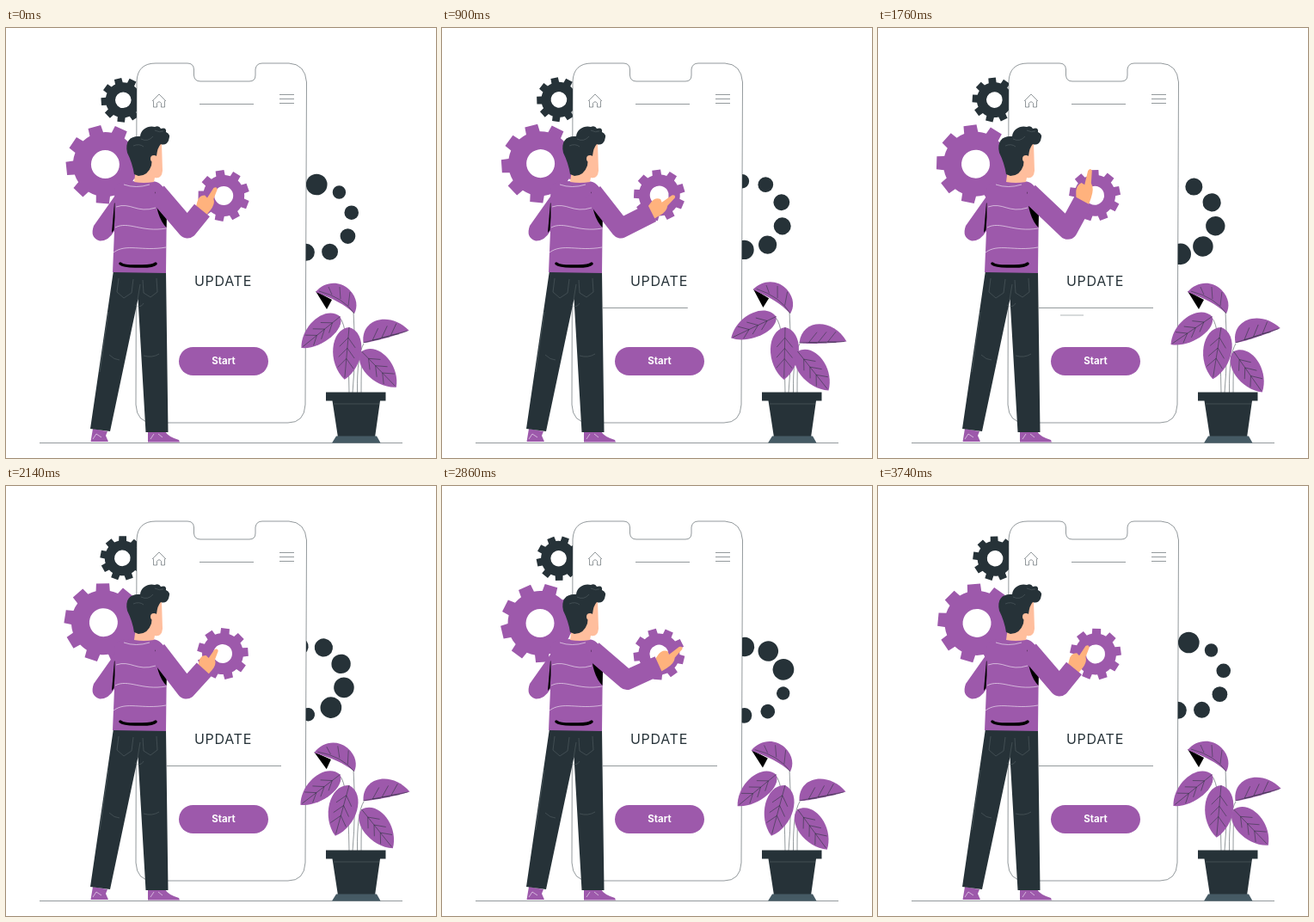
An HTML page for the animation above (3.84 s loop, 500 by 500 pixels).

```html
<!DOCTYPE html>
<html lang="en">
<head>
<meta charset="utf-8">
<title>Update</title>
<style>
html, body { margin: 0; width: 100%; height: 100%; overflow: hidden; background: #fff; }
svg { display: block; width: 100vw; height: 100vh; }
text { font-family: Inter, "Open Sans", sans-serif; text-anchor: middle; }
.p { fill: #9d59ab; }
.d { fill: #263238; }
.s { fill: #ffb27d; }
.f { fill: #ffbe9d; }
.l { fill: none; stroke: #263238; stroke-width: .5; }
.w { fill: none; stroke: #fff; stroke-width: .7; opacity: .8; }
.g { fill: none; stroke: #5d686d; stroke-width: .5; }
</style>
</head>
<body>
<svg viewBox="0 0 500 500">
  <path class="l" d="M39 482.5H461"/>
  <g id="dots" class="d"></g>
  <path id="gearDark" class="d" fill-rule="evenodd"/>
  <path id="gearBig" class="p" fill-rule="evenodd"/>

  <!-- phone -->
  <path class="l" style="fill:#fff" d="M152 62Q153 41 174 41H211Q218 41 218.500 48V55Q219 62 226 62H283Q290 62 290 55V48Q291 41 298 41H329Q348 42 349.500 63L348 438Q347 459 328 459H171Q152 459 151 438Z"/>
  <path class="l" d="M170 85L178 77L186 85M171.500 84.500V92H175.500V87.500Q178 84 180.500 87.500V92H184.500V84.500M318 77.500H335M318 82.500H335M318 87.500H335M225 88.500H288"/>
  <path id="bar" class="l"/>
  <path id="sub" class="g"/>
  <text class="d" x="252.500" y="300" font-size="16" letter-spacing=".7">UPDATE</text>
  <rect class="p" x="201" y="371" width="104" height="33" rx="16.500"/>
  <text x="253" y="391" font-size="11.400" font-weight="700" fill="#fff">Start</text>
  <path id="gearSmall" class="p" fill-rule="evenodd"/>

  <!-- legs -->
  <path class="p" d="M101 466L118 469L116 474L119 481H98.500ZM165 469H185Q188 475 201 479L202 481.500H165Z"/>
  <path class="w" d="M101 478L105 472L111 476M168 478L172 472M177 472L182 476"/>
  <path class="d" d="M125 282L186 283L188.500 470H162.500L153.500 315L121 469L98 466Z"/>
  <path class="g" d="M131 291L129 307L137 314L146 308L148 292M159 293L160 308L168 313L176 307L175 291M153 316L156 298M120 380Q126 386 132 386M160 381Q170 384 178 379M119 330L109 400M150 322Q157 326 160 320"/>

  <!-- torso -->
  <path class="p" d="M127 186Q129 179 138 178L173 178.500Q184 181 187 196L186 285L124 284L126 236Q119 248 109 247.500Q97 244 102 230L126 196Z"/>
  <path d="M126 203L123 238L125.500 235Q127 220 126.500 204Z"/>
  <path d="M173.500 190Q176 203 187 215L186.500 232Q174 219 173.500 190Z"/>
  <path d="M133 274Q137 277.500 154 277Q171 277.500 174 274" fill="none" stroke="#000" stroke-width="3.500" stroke-linecap="round"/>
  <path class="w" d="M137 182Q151 187 167 182M128 208C145 202 152 216 174 209M127 232C142 224 158 238 186 233M125 261C140 250 158 260 186 255"/>

  <!-- arm -->
  <path id="hand" class="s" d="M-4 -7L5 -10Q13 -13 17 -7L16 -3L30 -3Q34 -1 31 1.500L19 4Q15 9 5 8L-4 7Z"/>
  <path id="sleeve" fill="none" stroke="#9d59ab" stroke-width="23" stroke-linejoin="round"/>

  <!-- head -->
  <path class="f" d="M151 164L149 179Q160 181 172 179L173 174Q181 176 182 166L181 134L164 136Z"/>
  <path class="d" d="M141 145C138 131 145 125 156 126C157 117 166 113 173 115Q178 113 180 117Q187 115 186 121Q192 123 189 131Q186 137 180 135Q176 139 175 149L170 151L169 160Q165 172 154 172L149 170Q147 157 141 145Z"/>
  <circle class="f" cx="172" cy="152" r="4"/>
  <path class="g" d="M157 129Q165 133 171 126M173 119Q179 122 183 120M148 137Q155 134 160 138"/>

  <!-- plant -->
  <path class="l" d="M388 337Q398 345 399 424M404 330Q407 380 403 424M416 367Q408 380 408.500 424M414 377Q413 395 413 424"/>
  <g id="plant"></g>
  <path class="d" d="M372 423.500H441.500V433.500H435L429 476H386L379.500 433.500H372Z"/>
  <path d="M384 474.500H431L435.500 482.500H379Z" fill="#455a64"/>
  <path class="g" d="M381 437H434"/>
</svg>
<script>
const NS = 'http://www.w3.org/2000/svg';
const $ = id => document.getElementById(id);
const LOOP = 3840, RAD = Math.PI / 180;

function add(parent, tag, attrs) {
  const el = document.createElementNS(NS, tag);
  for (const k in attrs) el.setAttribute(k, attrs[k]);
  return parent.appendChild(el);
}
const set = (el, k, v) => el.setAttribute(k, v);
const clamp = v => Math.max(0, Math.min(1, v));

// Smooth cyclic curve through rows of values
function track(times, rows, s) {
  const n = times.length - 1;
  let i = 0;
  while (i < n - 1 && s >= times[i + 1]) i++;
  const at = k => rows[(k + n) % n];
  const time = k => times[(k + n) % n] + Math.floor(k / n) * times[n];
  const h = time(i + 1) - time(i), u = clamp((s - time(i)) / h);
  return at(i).map((a, j) => {
    const b = at(i + 1)[j];
    const m0 = (b - at(i - 1)[j]) / (time(i + 1) - time(i - 1)) * h;
    const m1 = (at(i + 2)[j] - a) / (time(i + 2) - time(i)) * h;
    const d = b - a;
    return a + u * (m0 + u * (3 * d - 2 * m0 - m1 + u * (m0 + m1 - 2 * d)));
  });
}

// Nine-toothed wheel whose hub sits slightly off its pivot
function gear(id, x, y, r, root, hole, phase, off) {
  const el = $(id);
  const pt = (rad, deg) => (off + rad * Math.cos(deg * RAD)).toFixed(2) + ' ' + (rad * Math.sin(deg * RAD)).toFixed(2);
  let d = '';
  for (let k = 0; k < 9; k++) {
    const a = phase + 40 * k;
    d += `${k ? 'L' : 'M'}${pt(root, a - 12.5)}L${pt(r, a - 9.5)}L${pt(r, a + 9.5)}L${pt(root, a + 12.5)}`;
    d += `A${root} ${root} 0 0 1 ${pt(root, a + 27.5)}`;
  }
  d += `ZM${off + hole} 0A${hole} ${hole} 0 1 0 ${off - hole} 0A${hole} ${hole} 0 1 0 ${off + hole} 0Z`;
  set(el, 'd', d);
  return turn => set(el, 'transform', `translate(${x} ${y}) rotate(${-turn})`);
}
const gears = [
  gear('gearBig', 114.4, 158.6, 46, 37.5, 16.5, -106, 1),
  gear('gearSmall', 252.6, 195, 30, 24, 11, -99, .6),
  gear('gearDark', 135.8, 83.8, 26, 20.5, 9.3, -104, .5)
];

const dots = $('dots');
for (let k = 0; k < 9; k++) {
  const a = (-51 + 40 * k) * RAD;
  add(dots, 'circle', { cx: 4.7 + 40.5 * Math.cos(a), cy: 40.5 * Math.sin(a), r: 7.7 + .58 * k });
}

// Leaves point along +x from their base
const beats = [0, 445, 1070, 1470, 2130, 2690, 3000];
function leaf(x, y, len, up, down, angles) {
  const g = add($('plant'), 'g', {});
  add(g, 'path', { class: 'p', d: `M0 0C${.07 * len} ${-up} ${.72 * len} ${-up} ${len} 0C${.72 * len} ${down} ${.07 * len} ${down} 0 0Z` });
  let d = `M0 0L${len * .96} 0`;
  for (const f of [.2, .4, .6]) {
    d += `M${f * len} 0L${(f + .18) * len} ${-up * .42}M${f * len} 0L${(f + .18) * len} ${down * .42}`;
  }
  add(g, 'path', { class: 'l', d });
  const rows = angles.map(a => [a]);
  return s => set(g, 'transform', `translate(${x} ${y}) rotate(${track(beats, rows, s)[0]})`);
}

const topLeaf = add($('plant'), 'g', {});
add(topLeaf, 'path', { d: 'M-45 -26L-32 -5L-26 -16Z' });
add(topLeaf, 'path', { class: 'p', d: 'M0 0C-12 -11 -24 -17 -45 -25C-35 -37 -18 -39 -6 -28C4 -18 4 -7 0 0Z' });
add(topLeaf, 'path', { class: 'l', d: 'M0 0Q-13 -19 -41 -26M-7 -9L-5 -25M-16 -17L-17 -31M-26 -22L-30 -31' });
const topRows = [0, 1.5, 5, 0, -6, 5].map(a => [a]);

const leaves = [
  leaf(388.5, 335.5, 58, 16, 21, [141, 150, 156, 146, 141, 141]),
  leaf(399, 348, 61, 22, 22, [95, 92, 92, 99, 109, 99]),
  leaf(415.5, 366, 55, 28, 2, [-15, -4, -3, -18, -4, -20]),
  leaf(413.5, 376, 58, 22, 19, [46, 55, 48, 55, 48, 59]),
  s => set(topLeaf, 'transform', `translate(405 332) rotate(${track(beats, topRows, s)[0]})`)
];

// Arm poses: elbow, wrist, fingertip
const rest = [211, 233, 228, 212, 245, 186];
const low = [205, 236, 229, 218, 249, 201];
const lowOut = [203, 238, 237, 219, 263, 201];
const reach = [223, 217, 260, 201, 286, 178];
const reachUp = [226, 212, 257, 193, 278, 165];
const raised = [221, 234, 239, 201, 248, 164];
const armTimes = [0, 445, 630, 1070, 1190, 1470, 1945, 2130, 2570, 2690, 3000];
const armRows = [rest, low, lowOut, reach, reachUp, raised, low, lowOut, reach, reachUp];

function drawArm(s) {
  const [ex, ey, wx, wy, tx, ty] = track(armTimes, armRows, s);
  const dx = tx - wx, dy = ty - wy;
  set($('sleeve'), 'd', `M175 191L${ex} ${ey}L${wx} ${wy}`);
  set($('hand'), 'transform',
    `translate(${wx} ${wy}) rotate(${Math.atan2(dy, dx) / RAD}) scale(${Math.hypot(dx, dy) / 32} 1)`);
}

function drawBars(s) {
  const c = s % 1000;
  let f = s < 1000 ? s / 1020 : s < 2000 ? c / 350 : c / 191;
  if (s >= 3000) f = 1;
  set($('bar'), 'd', f > 0 ? `M187 325.500H${187 + 133 * clamp(f)}` : '');
  const g = s > 1000 && s < 1770 ? .9 - (s - 1000) * .00118 : 0;
  set($('sub'), 'd', g > 0 ? `M212 334H${212 + 81 * g}` : '');
}

// The motion slows slightly before the closing pause
function pace(t) {
  return t < 3200 ? t * 2690 / 3200 : Math.min(3000, 2690 + (t - 3200) * 310 / 540);
}

function draw(t) {
  const s = pace(t);
  gears.forEach(turn => turn(s * 360 / 3500));
  set(dots, 'transform', `translate(357.300 222.500) rotate(${-s * .12})`);
  leaves.forEach(move => move(s));
  drawArm(s);
  drawBars(s);
}

const start = performance.now();
function tick() {
  draw((performance.now() - start) % LOOP);
  requestAnimationFrame(tick);
}
tick();
</script>
</body>
</html>
```
